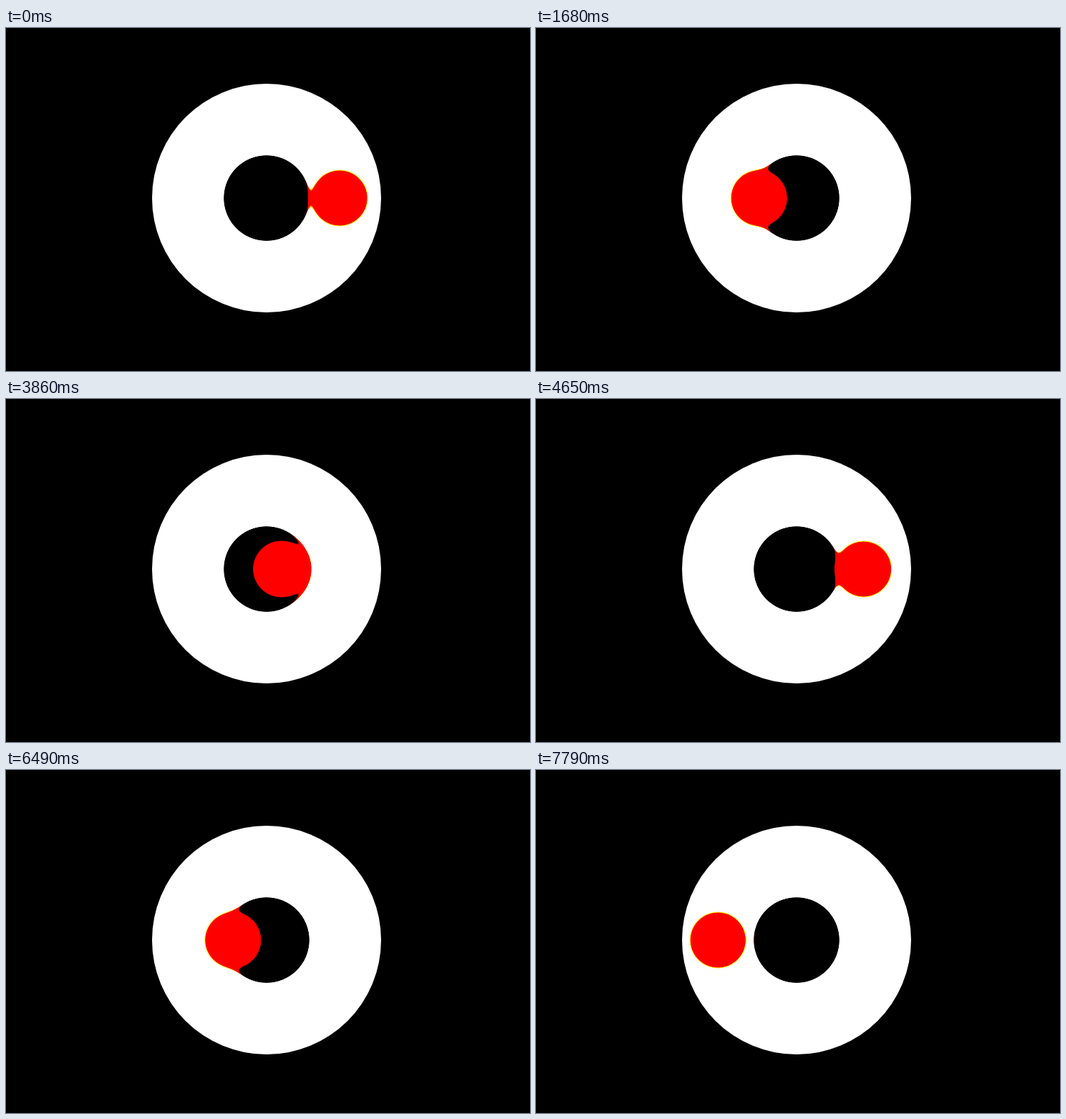
Animation, 732 px wide and 480 px high, one loop 7890 ms. Source, as an HTML page:

```html
<!DOCTYPE html>
<html lang="en">
<head>
<meta charset="utf-8">
<title>Gooey circles</title>
<style>
  html, body { margin: 0; width: 100%; height: 100%; overflow: hidden; background: #000; }
  #disc, .ball { position: absolute; border-radius: 50%; }
  #disc { left: 204px; top: 78px; width: 320px; height: 320px; overflow: hidden; background: #fff; filter: contrast(20); }
  .ball { filter: blur(6px); }
  #hole { left: 100px; top: 100px; width: 120px; height: 120px; background: #000; }
  #drop { left: 120px; top: 120px; width: 80px; height: 80px; background: #ff1e00; will-change: transform; }
</style>
</head>
<body>
<div id="disc">
  <div class="ball" id="hole"></div>
  <div class="ball" id="drop"></div>
</div>
<script>
const LOOP = 7890;
const STEP = 87.4;         // display time of one step
const LAST_STEP = 89;
const SWING = 2500 / 90;   // steps from one side to the other
const FIRST_TURN = 6.68;   // step at which the drop first leaves the right side
const REACH = 110;
const drop = document.getElementById('drop');

// cubic-bezier(.25, .1, .25, 1)
function ease(x) {
  let lo = 0, hi = 1;
  for (let i = 0; i < 30; i++) {
    const s = (lo + hi) / 2;
    if (0.75 * s - 0.75 * s * s + s ** 3 < x) lo = s; else hi = s;
  }
  const s = (lo + hi) / 2, r = 1 - s;
  return 0.3 * s * r * r + 3 * s * s * r + s ** 3;
}

function render(ms) {
  const step = Math.min(LAST_STEP, Math.max(0, Math.floor((ms % LOOP - 10) / STEP)));
  const swings = (step - FIRST_TURN) / SWING;
  const leg = Math.floor(swings);
  const from = leg % 2 === 0 ? REACH : -REACH;
  const x = from * (1 - 2 * ease(swings - leg));
  drop.style.transform = `translateX(${x.toFixed(2)}px)`;
}

function tick() {
  render(performance.now());
  requestAnimationFrame(tick);
}
tick();
</script>
</body>
</html>
```
